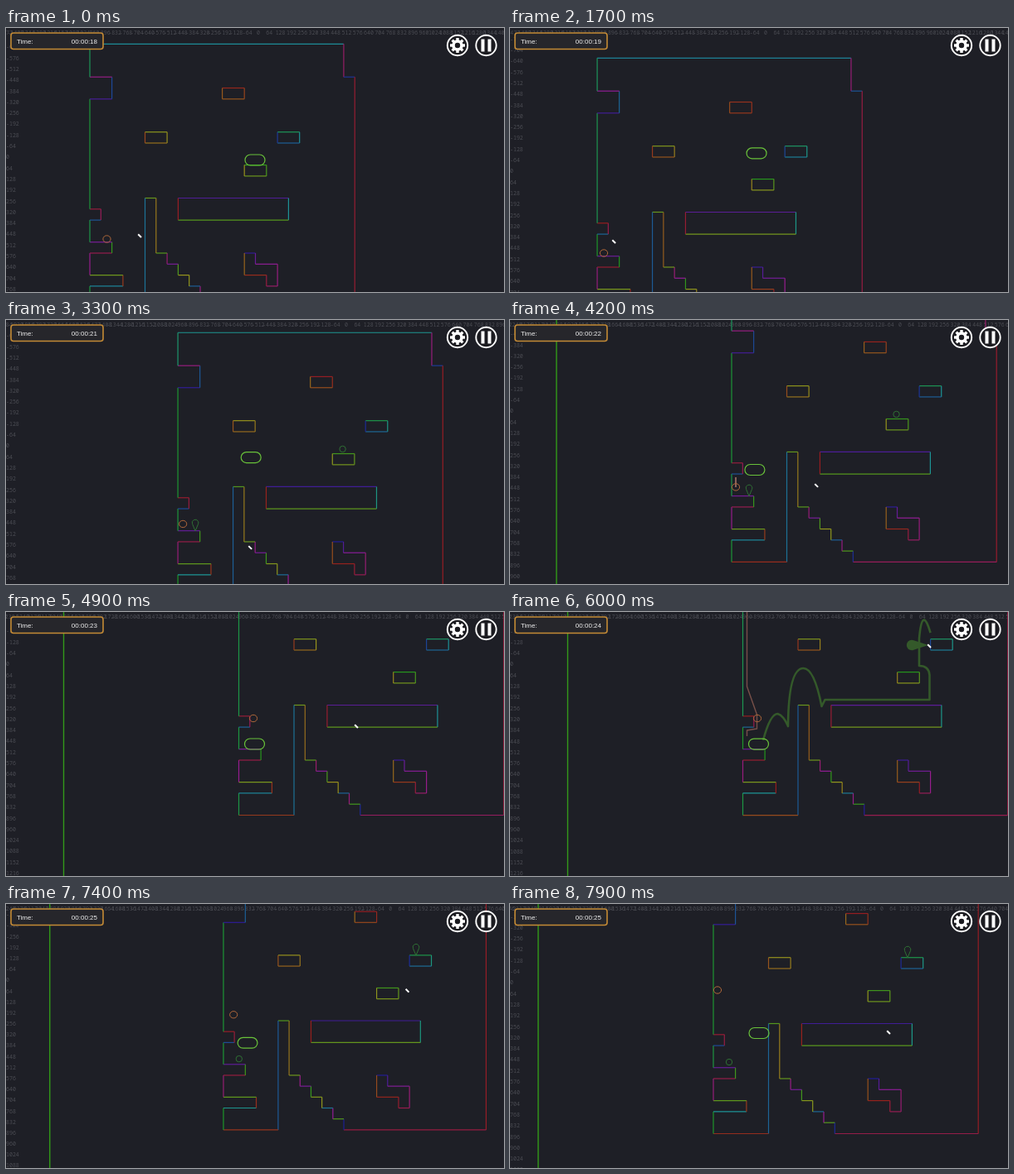
These frames come from a looping animation (600x319 px, 8 s). An HTML page with a canvas:

```html
<!DOCTYPE html>
<html lang="en">
<head>
<meta charset="utf-8">
<title>Neon platform level</title>
<style>
  html, body { margin: 0; width: 100%; height: 100%; overflow: hidden; background: #1e1f26; }
  canvas { display: block; }
</style>
</head>
<body>
<canvas id="stage" width="600" height="319"></canvas>
<script>
const ctx = document.getElementById('stage').getContext('2d');
const W = 600, H = 319, LOOP = 8000;
const UNIT = 13.3, LEFT = 101, TOP = 19.3;   // level grid
const ZERO_X = 304, ZERO_Y = 156.5;          // ruler zero in level pixels

// Key points: time, x, y, then zoom for the camera or jump height for the player.
const CAMERA = [[950, 0, 0, 1], [1700, 4, 17, 1], [3300, 106, -4, 1], [4200, 166, -46, 1],
  [4900, 179.5, -93, 1], [6000, 179.5, -93, 1], [6900, 179.7, -64.5, .983], [7900, 144, -61, 1]];
const PLAYER = [[1000, 300, 159.5, 30], [2000, 290, 159.5, 0], [2250, 274, 159.5, 10], [2500, 258, 199, 0],
  [3050, 203, 199, 45], [3900, 156, 228, 26], [4300, 120, 252.5, 0], [7200, 120, 252.5, 12], [7900, 156, 217, 0]];
const CLIMBER = [[0, 121.5, 255], [1700, 109, 255], [4200, 106, 248], [4800, 118.5, 221.5],
  [7050, 118.5, 221.5], [7900, 106, 165]];
const CURSOR = [[900, 161, 251], [1700, 125, 258], [3300, 294, 275], [4200, 369, 200],
  [6000, 505, 41], [6900, 511, 54], [7900, 456, 155]];

const mix = (a, b, u) => a + (b - a) * u;
const ramp = (from, to, t) => Math.min(1, Math.max(0, (t - from) / (to - from)));
const random = n => Math.abs(Math.sin(n * 12.99) * 43758.5) % 1;

function at(keys, t) {
  const next = keys.findIndex(k => k[0] > t);
  if (next < 1) return keys.at(next).slice(1);
  const a = keys[next - 1], b = keys[next], u = ramp(a[0], b[0], t);
  return a.slice(1).map((v, i) => mix(v, b[i + 1], u));
}

function playerAt(t) {
  const [x, y] = at(PLAYER, t);
  const next = PLAYER.findIndex(k => k[0] > t);
  if (next < 1) return [x, y];
  const u = ramp(PLAYER[next - 1][0], PLAYER[next][0], t);
  return [x, y - PLAYER[next - 1][3] * 4 * u * (1 - u)];
}

// Outlines walk the grid in alternating horizontal and vertical steps.
const ledge = (width, height = 1) => [width, -height, -width];
const stairs = count => Array(count * 2).fill(-1);
const box = (x, y, w, h, hue, turn) => ({ x, y, steps: [w, h, -w, -h], hue: i => hue + turn * i });
const LONG_EDGES = { 0: 185, 3: 348, 4: 335, 15: 40, 17: 205, 18: 15, 31: 138 };
const SHAPES = [
  {
    x: 0, y: 0,
    steps: [23, 3, 1, 21, -13, ...stairs(5), -5, -1, 10, -5, -2, ...ledge(3), -2, ...ledge(2), -2,
      ...ledge(1), -10, ...ledge(2, 2), -3],
    hue: i => LONG_EDGES[i] ?? random(i) * 360
  },
  box(12, 4, 2, 1, 5, 8),
  box(5, 8, 2, 1, 65, -15),
  box(17, 8, 2, 1, 150, 25),
  box(14, 11, 2, 1, 110, -18),
  box(8, 14, 10, 2, 265, -90),
  { x: 14, y: 19, steps: [1, 1, 2, 2, -1, -1, -2, -2], hue: i => 250 + 20 * i }
];

function stroke(color, width, trace) {
  ctx.beginPath();
  trace();
  ctx.strokeStyle = color;
  ctx.lineWidth = width;
  ctx.stroke();
}

function line(x1, y1, x2, y2, color, width) {
  stroke(color, width, () => { ctx.moveTo(x1, y1); ctx.lineTo(x2, y2); });
}

function ring(x, y, rx, ry, color, width = 1) {
  stroke(color, width, () => ctx.ellipse(x, y, rx, ry, 0, 0, Math.PI * 2));
}

function drawRulers(sx, sy, zoom) {
  const gap = UNIT * zoom;
  ctx.font = '6.6px "Noto Sans Mono", "DejaVu Sans Mono", monospace';
  ctx.textBaseline = 'middle';
  ctx.fillStyle = '#4b4c53';
  const each = (origin, from, to, write) => {
    for (let k = Math.ceil((from - origin) / gap); origin + k * gap < to; k++) write(k * 64, origin + k * gap);
  };
  ctx.textAlign = 'center';
  each(sx(ZERO_X), -20, W + 20, (n, x) => ctx.fillText(n, x, 6));
  ctx.textAlign = 'left';
  each(sy(ZERO_Y), 12, H + 5, (n, y) => ctx.fillText(n, 0, y));
}

function drawShapes(t, sx, sy) {
  line(sx(-110), 0, sx(-110), H, 'hsl(108,72%,35%)', 1.4);
  const px = n => sx(LEFT + n * UNIT), py = n => sy(TOP + n * UNIT);
  for (const shape of SHAPES) {
    let { x, y } = shape;
    shape.steps.forEach((step, i) => {
      const nx = i % 2 ? x : x + step, ny = i % 2 ? y + step : y;
      const hue = shape.hue(i) + 8 * Math.sin(t / 700 + i);
      line(px(x), py(y), px(nx), py(ny), `hsl(${hue},68%,35%)`, 1.2);
      x = nx;
      y = ny;
    });
  }
}

function drop(x, y, length, radius, angle, color, filled) {
  ctx.save();
  ctx.translate(x, y);
  ctx.rotate(angle);
  ctx.beginPath();
  ctx.moveTo(0, 0);
  ctx.arc(length, 0, radius, -1.98, 1.98);
  ctx.closePath();
  ctx.fillStyle = ctx.strokeStyle = color;
  ctx.lineWidth = 1;
  filled ? ctx.fill() : ctx.stroke();
  ctx.restore();
}

function drawRoutes(t, sx, sy) {
  const settle = ramp(6000, 6900, t);
  const to = (x, y) => ctx.lineTo(sx(x), sy(y));
  const bend = (a, b, x, y) => ctx.quadraticCurveTo(sx(a), sy(b), sx(x), sy(y));
  ctx.save();
  ctx.globalAlpha = ramp(5000, 5300, t) * (1 - .5 * settle) * (1 - ramp(6900, 7200, t));
  ctx.lineJoin = 'round';
  stroke('#34592a', 2.6, () => {
    to(125.5, 248);
    bend(134, 216, 143, 216);
    bend(150, 218, 155.5, 231);
    bend(156, 161, 174, 161);
    bend(187, 161, 196, 207);
    to(200, 199);
    to(326, 199);
    to(326, 169);
    bend(325, 158, 313.5, 158);
    to(313.5, mix(125, 132, settle));
    bend(317, mix(84, 102, settle), mix(327, 336, settle), 118);
  });
  stroke('#775049', 1.4, () => {
    to(106, 243);
    to(106, 236);
    to(118, 234);
    to(118, 217);
    to(106, 183);
    to(106, 89);
  });
  const [x, y] = at(CURSOR, t);
  drop(x - 1, y - 1, mix(20, 13, settle), 6.2, Math.PI * mix(1, 1.5, settle), '#34592a', true);
  ctx.restore();
}

function drawMarkers(t, sx, sy) {
  const color = '#2f7034';
  const mark = (startX, startY, tipX, tipY) => {
    ring(sx(startX), sy(startY), 3.7, 3.7, color);
    drop(sx(tipX), sy(tipY), 10, 3.8, -Math.PI / 2, color, false);
  };
  if (t >= 2000 && t < 4300) mark(299.5, 160, 122, 259);
  if (t >= 7200) mark(120, 252, 335, 126);
}

function drawActors(t, sx, sy, zoom) {
  const [px, py] = playerAt(t), [cx, cy] = at(CLIMBER, t);
  if (t > 4000 && t < 4500) line(sx(106), sy(236), sx(106), sy(248), '#b98272', 1.4);
  ring(sx(cx), sy(cy), 4.6 * zoom, 4.2 * zoom, '#b0683a');
  stroke('#69c23a', 1.2, () =>
    ctx.roundRect(sx(px) - 12 * zoom, sy(py) - 6.5 * zoom, 24 * zoom, 13 * zoom, 6.5 * zoom));
}

function drawHud(t) {
  ctx.beginPath();
  ctx.roundRect(6, 6, 111, 19.5, 3);
  ctx.fillStyle = '#26262b';
  ctx.fill();
  ctx.strokeStyle = '#c48a35';
  ctx.lineWidth = 1.6;
  ctx.stroke();
  ctx.font = '8px "Liberation Sans", Arial, sans-serif';
  ctx.textBaseline = 'alphabetic';
  ctx.fillStyle = '#f0f0f0';
  ctx.textAlign = 'left';
  ctx.fillText('Time:', 13, 19);
  ctx.textAlign = 'right';
  ctx.fillText('00:00:' + Math.min(25, Math.floor(18.15 + t / 1000)), 110, 19);

  const white = '#fff';
  for (const x of [544, 578.5]) {
    ctx.beginPath();
    ctx.arc(x, 21, 13, 0, Math.PI * 2);
    ctx.fillStyle = '#1b1b20';
    ctx.fill();
    ring(x, 21, 12.2, 12.2, white, 1.9);
  }
  ctx.fillStyle = white;
  for (let i = 0; i < 8; i++) {
    ctx.save();
    ctx.translate(544, 21);
    ctx.rotate(i * Math.PI / 4);
    ctx.fillRect(-1.7, -9, 3.4, 4);
    ctx.restore();
  }
  ring(544, 21, 5, 5, white, 3.6);
  for (const x of [572.5, 580.5]) ctx.fillRect(x, 13.5, 4, 15);
}

function drawCursor(t) {
  const [x, y] = at(CURSOR, t);
  line(x - 1.8, y - 1.8, x + 2, y + 2, '#fff', 2);
}

function draw(t) {
  const [tx, ty, zoom] = at(CAMERA, t);
  const sx = x => x * zoom + tx, sy = y => y * zoom + ty;
  ctx.fillStyle = '#1e1f26';
  ctx.fillRect(0, 0, W, H);
  drawRulers(sx, sy, zoom);
  drawShapes(t, sx, sy);
  drawRoutes(t, sx, sy);
  drawMarkers(t, sx, sy);
  drawActors(t, sx, sy, zoom);
  drawHud(t);
  drawCursor(t);
}

const start = performance.now();
function tick() {
  draw((performance.now() - start) % LOOP);
  requestAnimationFrame(tick);
}
tick();
</script>
</body>
</html>
```
